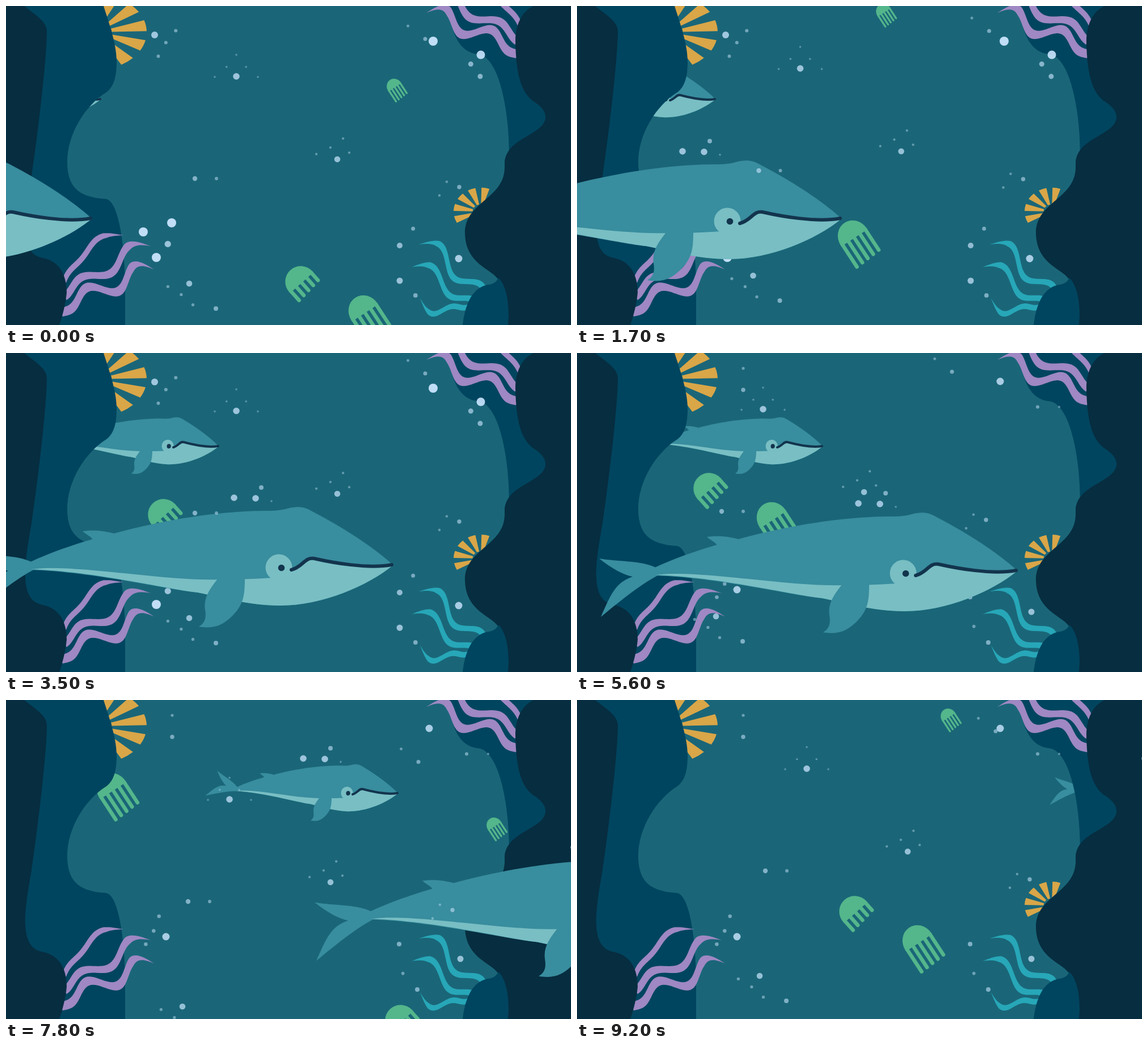
Write an HTML page with a canvas that moves like this. It is 996 px wide and 562 px high and loops after 9300 ms.

```html
<!DOCTYPE html>
<html lang="en">
<head>
<meta charset="utf-8">
<title>Whales</title>
<style>
html, body { margin: 0; width: 100%; height: 100%; overflow: hidden; background: #1a6678; }
canvas { display: block; }
</style>
</head>
<body>
<canvas id="sea" width="996" height="562"></canvas>
<script>
const ctx = document.getElementById('sea').getContext('2d');
const { PI, sin, cos, min, max, floor, hypot, sign } = Math;
const LOOP = 9300;
const C = {
  sea: '#1a6678', rock: '#00455f', dark: '#072d40', body: '#388d9e', belly: '#78bec3',
  ink: '#13344d', sand: '#d9a648', violet: '#9f88c3', teal: '#27a7b8', jelly: '#54b68b'
};
const P = d => new Path2D(d);

function fill(path, color) {
  ctx.fillStyle = color;
  ctx.fill(path);
}

function disc(x, y, r, color) {
  ctx.fillStyle = color;
  ctx.beginPath();
  ctx.arc(x, y, r, 0, 2 * PI);
  ctx.fill();
}

// The scene advances in whole steps, held longer in the middle of the loop.
function stepAt(t) {
  if (t < 2900) return floor(t / 100);
  if (t < 4100) return 29 + floor((t - 2900) / 200);
  if (t < 5900) return 35 + floor((t - 4100) / 300);
  if (t < 6900) return 41 + floor((t - 5900) / 200);
  return 46 + floor((t - 6900) / 100);
}

// Smooth curve through one value per key step.
const KEYS = [0, 17, 32, 40, 47, 55, 69];
function track(...values) {
  const slope = (i, j) => (values[j] - values[i]) / (KEYS[j] - KEYS[i]);
  const end = KEYS.length - 1;
  return step => {
    let i = 0;
    while (i < end - 1 && step >= KEYS[i + 1]) i++;
    const span = KEYS[i + 1] - KEYS[i], u = (step - KEYS[i]) / span;
    const d = values[i + 1] - values[i];
    const m = slope(max(0, i - 1), i + 1) * span, n = slope(i, min(end, i + 2)) * span;
    return values[i] + u * (m + u * (3 * d - 2 * m - n + u * (m + n - 2 * d)));
  };
}

const bigX = track(151, 466, 682, 776, 993, 1281, 1880);
const bigY = track(374, 374, 373, 383, 383, 377.5, 377);
const smallX = track(167, 244, 375, 433, 543, 691, 1168);
const jellyX = track(0, -144, -242, -287, -361, -444, -650);
const jellyY = track(0, -132, -201, -247, -305, -381, -573);
const driftX = track(0, -12.5, 0, -78, -4, -12, -1);
const driftY = track(0, -14, -22, -25, -6, 51, -3);

const leftRock = P('M0 0H172C185 40 195 70 195 98C195 125 190 142 177 152C140 175 108 225 108 275C108 325 135 337 176 340C198 342 210 420 210 500V562H0Z');
const leftDark = P('M0 0H32C55 18 72 28 72 45C72 90 57 220 45 300C38 340 33 370 34 395C35 425 45 440 65 444C95 450 107 475 107 505C105 525 100 545 94 562H0Z');
const rightRock = P('M779 0C785 50 800 82 832 85C868 88 887 180 887 262H996V0Z');
const rightDark = P('M930 0C908 10 898 35 898 62C899 130 912 155 930 168C946 178 952 188 951 198C946 228 883 232 879 275V285C878 340 809 345 809 400C810 455 855 462 868 482V562H996V0Z');
const rightFoot = P('M805 562C810 520 825 495 850 491C860 490 865 485 868 479C880 490 886 515 886 545L885 562Z');

// Five coral rays around a centre, angles in degrees.
function coral(x, y, rx, ry, start, step) {
  const rad = PI / 180;
  ctx.fillStyle = C.sand;
  for (let i = 0; i < 5; i++) {
    const a = (start + i * step) * rad, half = 8.5 * rad;
    ctx.beginPath();
    ctx.ellipse(x, y, rx, ry, 0, a - half, a + half);
    ctx.ellipse(x, y, rx * 0.3, ry * 0.3, 0, a + half, a - half, true);
    ctx.fill();
  }
}

// Wavy ribbon that widens from its tip towards its base.
function kelp(color, [x, y], [bx, by], waves, swing, bend, width) {
  const len = hypot(bx - x, by - y), side = sign(bx - x) / len;
  const nx = (y - by) * side, ny = (bx - x) * side;
  const edge = (u, dir) => {
    const wave = -len * (swing * (1 - u ** 4) * sin(2 * PI * waves * u) + bend * sin(PI * u));
    const off = wave + dir * width * min(1, 5 * u);
    ctx.lineTo(x + (bx - x) * u + nx * off, y + (by - y) * u + ny * off);
  };
  ctx.fillStyle = color;
  ctx.beginPath();
  for (let u = 0; u < 1.03; u += 0.02) edge(u, -1);
  for (let u = 1.02; u > 0; u -= 0.02) edge(u, 1);
  ctx.fill();
}

function kelpBeds() {
  kelp(C.violet, [207, 404], [104, 481], 1.1, 0.06, 0.15, 5);
  kelp(C.violet, [255, 423], [106, 510], 1.5, 0.09, 0.05, 7);
  kelp(C.violet, [261, 464], [100, 539], 1.78, 0.1, 0.05, 8);
  kelp(C.violet, [794, -48], [905, 31], 1.1, 0.06, 0.15, 5);
  kelp(C.violet, [746, -28], [898, 60], 1.5, 0.09, 0.05, 7);
  kelp(C.violet, [741, 12], [899, 84], 1.78, 0.1, 0.05, 8);
  kelp(C.teal, [728, 420], [842, 497], 1.15, 0.14, 0.01, 5.5);
  kelp(C.teal, [715, 460], [822, 517], 1, 0.15, 0, 5.5);
  kelp(C.teal, [730, 515], [818, 528], 1.1, -0.13, -0.19, 5);
}

// Whale drawn with its nose and tail hinge at these points.
const NOSE = [994, 383], HINGE = [359, 386];
const whaleBody = P('M994 383Q940 335 850 288C835 280 825 280 808 284C790 290 760 287 735 289C650 293 560 312 502 328C440 343 390 362 355 378L356 392C470 396 590 426 650 432C690 440 740 455 795 455C870 455 950 420 994 384Z');
const whaleDorsal = P('M447 324C465 322 480 322 506 329L490 345L465 339C462 333 455 331 447 324Z');
const whaleBelly = P('M357 391C400 385 470 393 560 402C640 411 700 411 782 406L815 392C835 386 840 371 855 372C880 376 950 391 994 384C950 420 870 455 795 455C740 455 690 440 650 432C590 425 470 395 357 391Z');
const whaleFin = P('M685 408C672 425 660 440 663 462C665 475 664 485 652 492C680 497 695 488 708 476C730 455 733 440 733 407Z');
const whaleTail = P('M257 362C290 368 330 365 357 378L362 391C330 408 300 432 260 465C278 425 285 405 316 394C300 391 280 380 257 362Z');
const whaleMouth = P('M815 392C835 387 839 369 855 372C886 379 950 391 992 383');

function whale(x, y, scaleX, scaleY, turn, tailTurn, weight) {
  ctx.save();
  ctx.translate(x, y);
  ctx.rotate(turn);
  ctx.scale(scaleX, scaleY);
  ctx.translate(-NOSE[0], -NOSE[1]);
  fill(whaleBody, C.body);
  fill(whaleDorsal, C.body);
  ctx.save();
  ctx.translate(...HINGE);
  ctx.rotate(tailTurn);
  ctx.translate(-HINGE[0], -HINGE[1]);
  fill(whaleTail, C.body);
  ctx.restore();
  fill(whaleBelly, C.belly);
  fill(whaleFin, C.body);
  disc(793, 388, 23.5, C.belly);
  disc(797.5, 388.5, 5.8 * weight, C.ink);
  ctx.strokeStyle = C.ink;
  ctx.lineWidth = 6 * weight;
  ctx.lineCap = 'round';
  ctx.stroke(whaleMouth);
  ctx.restore();
}

function jelly(x, y, angle, dome, reach, scale) {
  ctx.save();
  ctx.translate(x, y);
  ctx.rotate(angle);
  ctx.scale(scale, scale);
  ctx.fillStyle = ctx.strokeStyle = C.jelly;
  ctx.beginPath();
  ctx.ellipse(0, 0, 27.5, dome, 0, PI, 0);
  ctx.lineTo(27.5, 2);
  ctx.lineTo(-27.5, 2);
  ctx.fill();
  ctx.lineWidth = 6.6;
  ctx.lineCap = 'round';
  ctx.beginPath();
  for (let i = -2; i <= 2; i++) {
    ctx.moveTo(i * 12.1, 0);
    ctx.lineTo(i * 12.1, reach - i - 3);
  }
  ctx.stroke();
  ctx.restore();
}

function jellies(dx, dy) {
  jelly(520 + dx, 486 + dy, -0.73, 28, 23, 1);
  jelly(632 + dx, 539 + dy, -0.58, 30, 48, 1);
  jelly(685 + dx, 142.5 + dy, -0.58, 30, 48, 0.49);
}

function bubble(x, y, r) {
  disc(x, y, r, `rgba(204,230,255,${min(1, 0.22 + 0.09 * r)})`);
}

// One leading bubble, with smaller ones fanned out around the aim angle.
function cluster(x, y, r, count, aim) {
  bubble(x, y, r);
  for (let i = 0; i < count; i++) {
    const a = aim + (i - (count - 1) / 2) * 0.8, reach = 38 - 14 * (i % 2);
    bubble(x + reach * cos(a), y + reach * sin(a), r * (0.8 - 0.1 * count));
  }
}

function restingEarly() {
  cluster(262, 51, 6, 3, 0.6);
  cluster(753, 62, 8, 0, 0);
  cluster(837, 86, 7.5, 2, 2);
  cluster(694, 484, 5.5, 1, 0.75);
  cluster(694, 422, 5, 1, -0.9);
  cluster(798, 445, 6.5, 0, 0);
  cluster(242, 398, 8, 0, 0);
  cluster(292, 382, 8, 1, 1.75);
  cluster(265, 443, 8, 0, 0);
}

function restingLate() {
  cluster(293, 65, 3.7, 1, -PI / 2);
  cluster(746, 50, 6.5, 0, 0);
  cluster(812, 95, 3, 1, 0);
  cluster(693, 430, 4, 0, 0);
  cluster(725, 510, 4, 1, -2.3);
  cluster(801, 456, 5.5, 0, 0);
  cluster(282, 417, 6.5, 3, -2.7);
}

function drifting(dx, dy) {
  ctx.save();
  ctx.translate(dx, dy);
  cluster(406, 124, 5.8, 5, -PI / 2);
  cluster(584, 270, 5.3, 4, -1.7);
  cluster(333, 304, 4.2, 1, 0);
  cluster(799, 319, 3.7, 2, PI);
  cluster(739, 58, 3.5, 1, -2.5);
  cluster(323, 489, 5.3, 3, 2.2);
  cluster(370, 533, 4, 0, 0);
  ctx.restore();
}

function breath(x, y) {
  bubble(x, y, 5.8);
  bubble(x + 38, y + 1, 5.8);
  bubble(x + 48, y - 18, 4);
  bubble(x + 66, y + 6, 1.8);
}

function draw(step) {
  ctx.fillStyle = C.sea;
  ctx.fillRect(0, 0, 996, 562);
  coral(160, 46, 88, 66, 52, -31);
  coral(837, 362, 48, 42, 160, 30);

  const jx = jellyX(step), jy = jellyY(step);
  jellies(jx, jy);
  jellies(jx + 620, jy + 460);
  const flap = 0.47 - 0.02 * max(0, step - 55);
  whale(smallX(step), 164, 0.447, 0.48, 0.027, flap, 1.4);

  fill(leftRock, C.rock);
  fill(rightRock, C.rock);
  if (step < 37) restingEarly();
  else restingLate();
  kelpBeds();
  fill(leftDark, C.dark);
  fill(rightDark, C.dark);
  fill(rightFoot, C.rock);

  const x = bigX(step), y = bigY(step);
  whale(x, y, 1, 1, 0, 0, 1);
  drifting(driftX(step), driftY(step));
  breath(x - 280, y - 118);
  if (step > 42) breath(smallX(step) - 167, 103);
}

function frame() {
  draw(stepAt(performance.now() % LOOP));
  requestAnimationFrame(frame);
}
frame();
</script>
</body>
</html>
```
